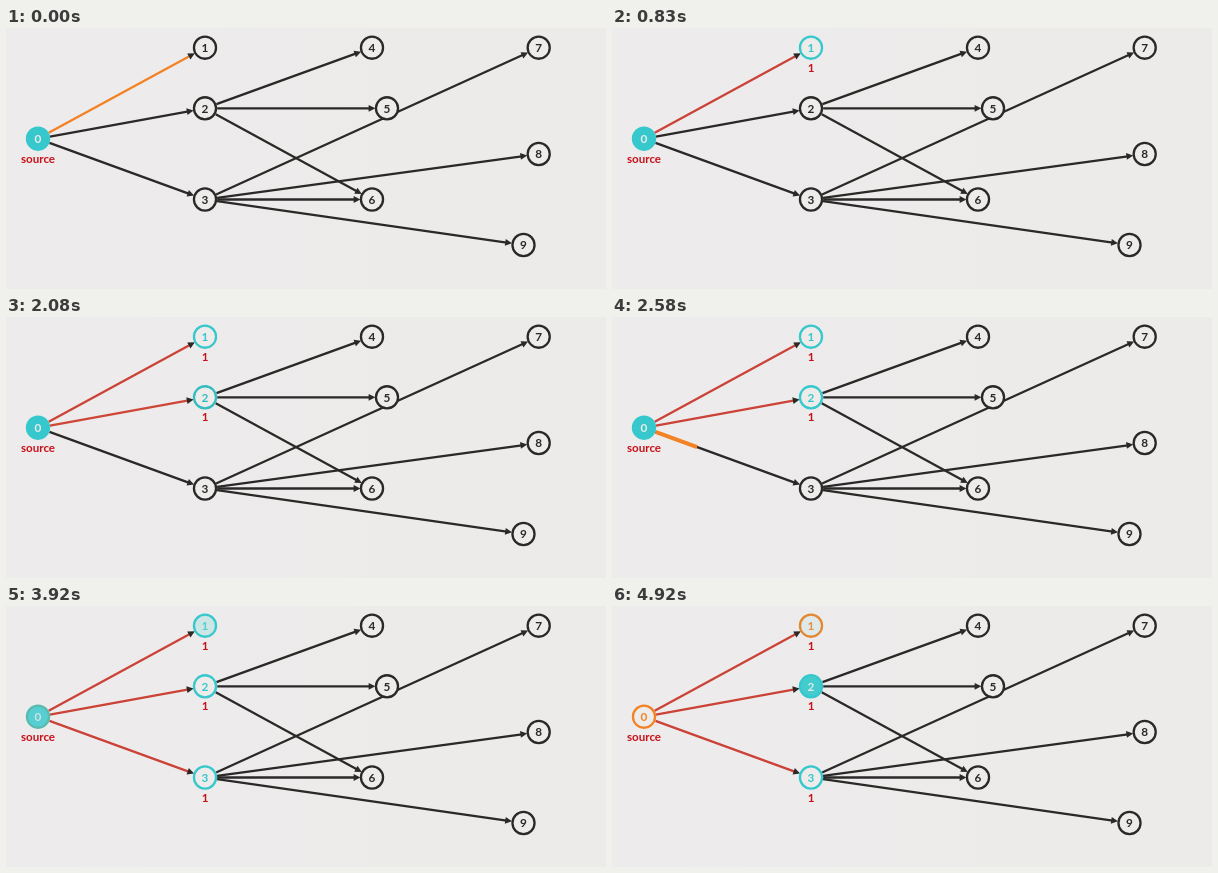
Animation, 600 px wide and 261 px high, one loop 5 s. Source, as an HTML page with a canvas:

```html
<!DOCTYPE html>
<html lang="en">
<head>
<meta charset="utf-8">
<title>Breadth-first search</title>
<style>
  html, body { margin: 0; width: 100%; height: 100%; overflow: hidden; background: #ecebea; }
  canvas { display: block; }
</style>
</head>
<body>
<canvas id="stage" width="600" height="261"></canvas>
<script>
const ctx = document.getElementById('stage').getContext('2d');

const LOOP = 5000, FPS = 12;
const FIRST_STEP = 10, STEP = 730, FADE = 720;
const RADIUS = 12.2, RIM = 2.3, LINE = 2.3, THICK = 4;

const DARK = [43, 40, 40], PAPER = [237, 236, 235], TEAL = [54, 200, 204];
const ORANGE = [243, 130, 36], RED = [203, 66, 55], LABEL = [200, 16, 24];

// reach: step that discovers a node; visit: step that fills it; leave: step that finishes it
const nodes = [
  { x: 32, y: 110.7, reach: -9, visit: -9, leave: 5, label: 'source' },
  { x: 199, y: 19.7, reach: 0, visit: 5, leave: 6, label: '1' },
  { x: 199, y: 80.3, reach: 2, visit: 6, label: '1' },
  { x: 199, y: 171.5, reach: 4, label: '1' },
  { x: 366, y: 19.7 },
  { x: 381, y: 80.3 },
  { x: 366, y: 171.5 },
  { x: 532.7, y: 19.7 },
  { x: 532.7, y: 126 },
  { x: 517.5, y: 217 }
];
const edges = [[0, 1], [0, 2], [0, 3], [2, 4], [2, 5], [2, 6], [3, 6], [3, 7], [3, 8], [3, 9]];

const rgb = c => `rgb(${c.map(Math.round)})`;
const mix = (a, b, k) => a.map((v, i) => v + (b[i] - v) * k);
const ease = x => x < 0.5 ? 4 * x ** 3 : 1 - 4 * (1 - x) ** 3;

// Linear progress of a step, 0 to 1; nodes without that step stay at 0
function progress(time, step) {
  if (step === undefined) return 0;
  return Math.min(1, Math.max(0, (time - FIRST_STEP - STEP * step) / FADE));
}
const eased = (time, step) => ease(progress(time, step));

function line(length, width, color) {
  ctx.strokeStyle = rgb(color);
  ctx.lineWidth = width;
  ctx.beginPath();
  ctx.moveTo(0, 0);
  ctx.lineTo(length, 0);
  ctx.stroke();
}

function drawEdge(time, [from, to]) {
  const a = nodes[from], b = nodes[to];
  const length = Math.hypot(b.x - a.x, b.y - a.y) - 2 * RADIUS;
  const grown = from === 0 ? progress(time, b.reach - 1) : 0;
  const color = grown < 1 ? DARK : mix(ORANGE, RED, eased(time, b.reach));

  ctx.save();
  ctx.translate(a.x, a.y);
  ctx.rotate(Math.atan2(b.y - a.y, b.x - a.x));
  ctx.translate(RADIUS, 0);
  line(length - 3, LINE, color);
  ctx.fillStyle = rgb(DARK);
  ctx.beginPath();
  ctx.moveTo(length - 6.2, -3.4);
  ctx.lineTo(length + 0.6, 0);
  ctx.lineTo(length - 6.2, 3.4);
  ctx.fill();
  if (grown > 0 && grown < 1) line(length * ease(grown), THICK, ORANGE);
  ctx.restore();
}

function text(string, x, y, size, color) {
  ctx.font = `bold ${size}px Lato, sans-serif`;
  ctx.fillStyle = rgb(color);
  ctx.fillText(string, x, y);
}

function drawNode(time, node, index) {
  const left = eased(time, node.leave);
  const filled = eased(time, node.visit) - left;
  const rim = mix(mix(DARK, TEAL, eased(time, node.reach)), ORANGE, left);

  ctx.beginPath();
  ctx.arc(node.x, node.y, RADIUS - RIM / 2, 0, 2 * Math.PI);
  ctx.fillStyle = rgb(mix(PAPER, TEAL, filled));
  ctx.fill();
  ctx.strokeStyle = rgb(rim);
  ctx.lineWidth = RIM;
  ctx.stroke();

  text(index, node.x, node.y + 4.2, 11.8, mix(rim, PAPER, filled));
  if (node.label && progress(time, node.reach) > 0) {
    text(node.label, node.x, node.y + 24, 11.6, LABEL);
  }
}

const backdrop = ctx.createLinearGradient(0, 0, 600, 0);
backdrop.addColorStop(0, '#edebec');
backdrop.addColorStop(1, '#ecebe9');
ctx.textAlign = 'center';

function frame() {
  const tick = Math.floor((performance.now() % LOOP) * FPS / 1000);
  const time = tick * 1000 / FPS;
  ctx.fillStyle = backdrop;
  ctx.fillRect(0, 0, 600, 261);
  edges.forEach(edge => drawEdge(time, edge));
  nodes.forEach((node, index) => drawNode(time, node, index));
  requestAnimationFrame(frame);
}
frame();
</script>
</body>
</html>
```
